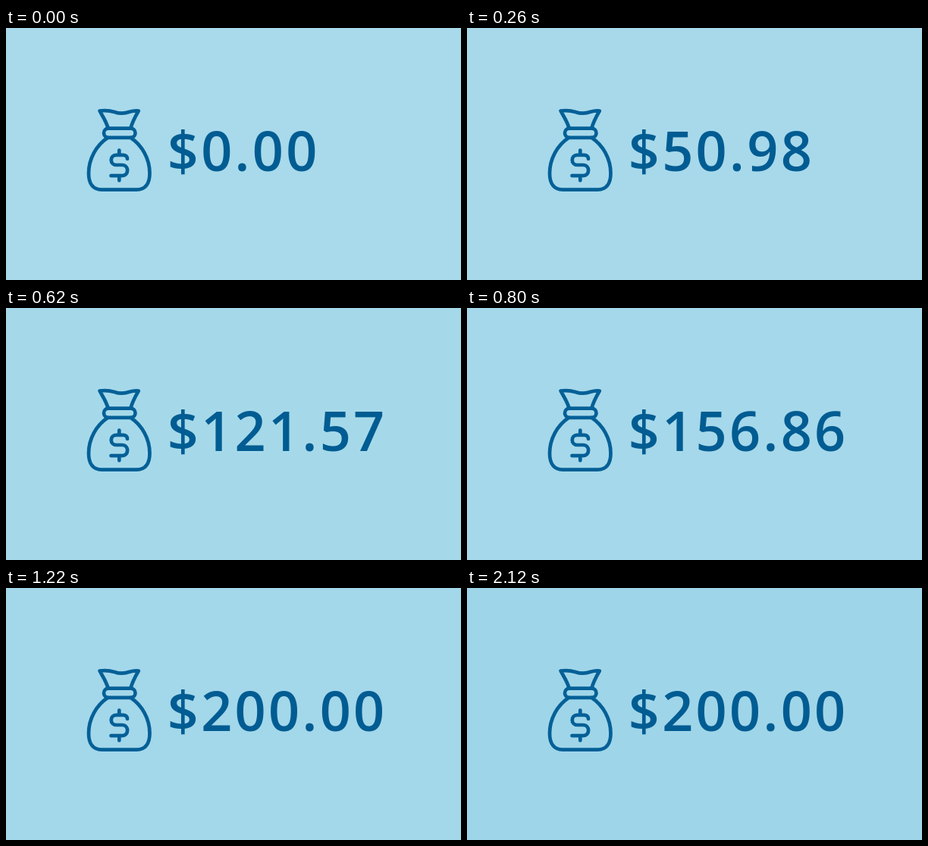
Write an HTML page without scripts that moves like this. It is 600 px wide and 333 px high and loops after 2140 ms.

```html
<!DOCTYPE html>
<html lang="en">
<head>
<meta charset="utf-8">
<title>Savings counter</title>
<style>
  @property --total { syntax: "<integer>"; initial-value: 0; inherits: true; }
  @property --dollars { syntax: "<integer>"; initial-value: 0; inherits: true; }
  @property --cents { syntax: "<integer>"; initial-value: 0; inherits: true; }

  html, body { margin: 0; width: 100%; height: 100%; overflow: hidden; }

  body {
    position: relative;
    background: #a8daeb;
    animation: tint 2140ms linear infinite;
  }

  svg {
    position: absolute;
    left: 0;
    top: 0;
    fill: none;
    stroke: #046097;
    stroke-width: 4.7;
    stroke-linecap: round;
    stroke-linejoin: round;
  }

  .amount {
    position: absolute;
    left: 212.7px;
    top: 112px;
    font: 600 72px/98px "Open Sans", "Noto Sans", sans-serif;
    letter-spacing: 3.35px;
    white-space: nowrap;
    color: #005c92;
    /* the total is in cents; integer rounding splits it in two */
    --dollars: max(0, calc((var(--total) - 49.5) / 100));
    --cents: calc(var(--total) - 100 * var(--dollars));
    counter-reset: dollars var(--dollars) cents var(--cents);
    animation: count 2140ms -2ms infinite;
  }
  .amount::after {
    content: counter(dollars) "." counter(cents, decimal-leading-zero);
  }

  @keyframes count {
    0% { --total: 0; animation-timing-function: steps(51); }
    47.66355%, 100% { --total: 20000; }
  }
  @keyframes tint {
    to { background: #9fd5e9; }
  }
</style>
</head>
<body>
<svg width="600" height="333" viewBox="0 0 600 333" aria-hidden="true">
  <path d="M134.5 132 C132 123 127 116 123.5 109.5 C131 108.5 137 109 143 111 C150 113.5 157 113 163 110.8 C167 109.4 171 109 174.8 109.5 C171 116 167 123 164.5 132"/>
  <rect x="129" y="132.6" width="41.5" height="12.2" rx="6.1"/>
  <path d="M134 145 C119 155 109 173 109 192 C109 206 115 213.6 126 213.6 H172.5 C183.5 213.6 189.5 206 189.5 192 C189.5 173 179.5 155 164.5 145"/>
  <path d="M160 173 C160 169.5 157.5 167.8 154.5 167.8 H145.5 C136.5 167.8 136.5 181 145.5 181 H153 C162.5 181 162.5 195.2 153 195.2 H138.5 M149.3 161.5 V167 M149.3 196 V201.5"/>
</svg>
<div class="amount">$</div>
</body>
</html>
```
